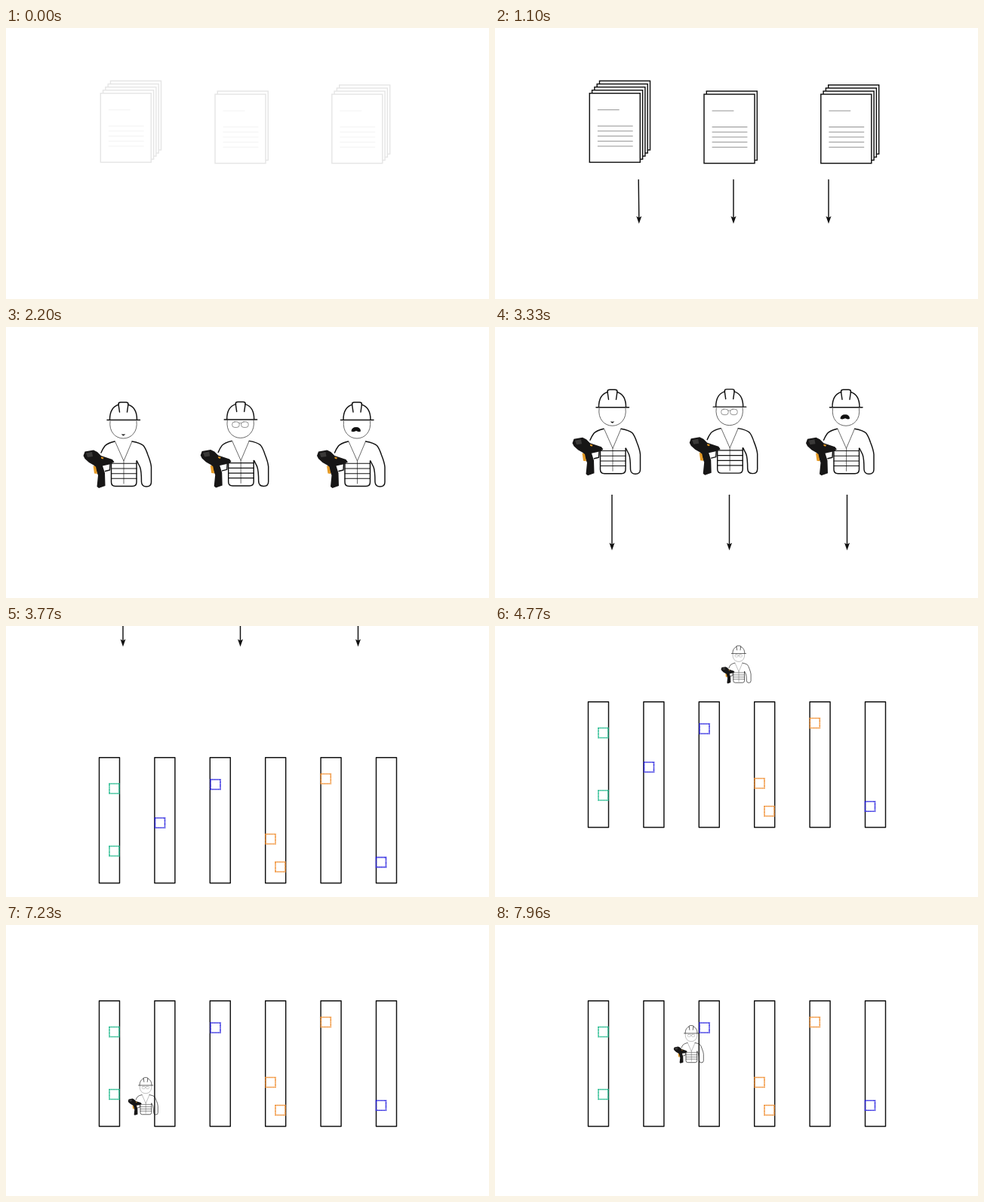
These frames come from a looping animation (640x360 px, 8 s). An HTML page:

```html
<!DOCTYPE html>
<html lang="en">
<head>
<meta charset="utf-8">
<title>Order picking</title>
<style>
  html, body { margin: 0; width: 100%; height: 100%; overflow: hidden; background: #fff; }
  svg { display: block; width: 100%; height: 100%; }
  .ink { fill: none; stroke: #111; stroke-width: 1.45; stroke-linecap: round; stroke-linejoin: round; }
  .thin { stroke: #444; stroke-width: .8; }
  .pale { stroke: #777; }
  .sheet { fill: #fff; stroke: #111; stroke-width: 1.45; }
  .slot { fill: none; stroke-width: 1.6; stroke-dasharray: 1.7 .4; }
</style>
</head>
<body>
<svg viewBox="0 0 640 360">
  <defs>
    <clipPath id="wipe1"><rect id="reveal1" x="0" y="201" width="640" height="0"/></clipPath>
    <clipPath id="wipe2"><rect id="reveal2" x="0" y="239" width="640" height="0"/></clipPath>
    <g id="worker">
      <g class="ink">
        <path d="M134 123.500H177.500M137.500 123C137.500 111 143 105 149.500 103M173.500 123C173.500 111 168 105 161.500 103M150.500 113L149 102.500Q149 100 152 100H159Q162 100 162 102.500L160.500 113"/>
        <path class="thin" d="M138 125C136 139 145 148 155.500 148S175 139 173 125"/>
        <path d="M144 152Q134 154.500 131 158Q128 162 126 167M167 152Q178 154 182 157.500Q185 161 188 170Q192 180 192.500 186V206Q192.500 212 186 212Q180 212 179.500 206Q179.500 191 177.500 186L173.500 178"/>
        <path d="M139.500 181V206Q139.500 211.500 145 211.500H167.500Q173 211.500 173 206V178"/>
        <path class="thin" d="M144.500 152L156 178L167 152M156 178V208"/>
        <path d="M139.500 181.200H173M139.500 188H173M139.500 194.700H173M139.500 201.200H173" stroke-width="1.100"/>
      </g>
      <path fill="#171616" d="M102.500 171L104.500 165.500L116 163.500L121 166L126 171L141 176L143.500 179.500L137 182.500L128 184.500L131 194L131.500 211L123 214L120.500 212L122 197L117 184L110 180L104.500 175Z"/>
      <path class="ink" stroke-width="1" d="M138 182L137.500 190L131.500 191.500"/>
      <path fill="#3a3938" d="M106 167.500L114 166L115 172L108 173Z"/>
      <path fill="#e59a25" d="M115.500 184L119 185.500L121 195L117 194.500ZM126 172.500L129.500 173.500L128.500 175.500L126 174.500Z"/>
    </g>
    <g id="glasses" class="ink thin pale">
      <rect x="144.500" y="126.500" width="9.500" height="7.500" rx="3.300"/>
      <rect x="156.500" y="126.500" width="9.500" height="7.500" rx="3.300"/>
      <path d="M154 128.500Q155.300 127.500 156.500 128.500"/>
    </g>
  </defs>
  <g id="orders">
    <g id="sheets"></g>
    <g id="arrows1" clip-path="url(#wipe1)"></g>
  </g>
  <g id="crew">
    <use href="#worker"/>
    <path d="M152.800 142Q155.500 143 158.200 142Q155.500 146.800 152.800 142Z" fill="#111"/>
    <g transform="translate(155.200 -.6)"><use href="#worker"/><use href="#glasses"/></g>
    <use href="#worker" x="309.500"/>
    <path d="M457.500 138.500Q458 133 464 133Q469.800 133 470 138.500Q467.500 140 464 138Q460.500 140 457.500 138.500Z" fill="#111"/>
    <g id="arrows2" clip-path="url(#wipe2)"></g>
  </g>
  <g id="racks"></g>
  <g id="picker"><g transform="scale(.44) translate(-102 -99.500)"><use href="#worker"/><use href="#glasses"/></g></g>
</svg>
<script>
const $ = id => document.getElementById(id);
const clamp = x => Math.max(0, Math.min(1, x));
const span = (t, start, length) => clamp((t - start) / length);
const smooth = x => .5 - .5 * Math.cos(Math.PI * x);

function pile(x, y, count, dx) {
  let out = '';
  for (let i = count - 1; i >= 0; i--)
    out += `<rect class="sheet" x="${x + i * dx}" y="${y - i * 4.1}" width="67" height="91.700"/>`;
  let lines = `M${x + 11} ${y + 22}h28`;
  for (let i = 0; i < 5; i++) lines += `M${x + 11} ${y + 43.5 + i * 6.7}h46`;
  return out + `<path class="ink thin pale" d="${lines}"/>`;
}

const arrow = (x, top, tip, lean = 0) =>
  `<path class="ink" stroke-linecap="butt" d="M${x - lean} ${top}L${x} ${tip - 8}"/>` +
  `<path fill="#111" d="M${x} ${tip}l-3.500 -10l3.500 2l3.500 -2Z"/>`;

const slot = (x, y, color, id = '') =>
  `<rect class="slot" id="${id}" x="${x}" y="${y}" width="13" height="13" stroke="${color}"/>`;

const green = '#1fba8c', blue = '#2a24e0', orange = '#f08d2e';

$('sheets').innerHTML = pile(125.3, 86.7, 5, 3.3) + pile(277, 88, 2, 3.3) + pile(431.8, 88, 4, 3.3);
$('arrows1').innerHTML = arrow(190.8, 201.7, 260, .6) + arrow(316, 201.7, 260) + arrow(442, 201.7, 260);
$('arrows2').innerHTML = [155, 310.5, 466.5].map(x => arrow(x, 240, 313.5)).join('');
$('racks').innerHTML =
  [0, 1, 2, 3, 4, 5].map(i =>
    `<rect class="ink" x="${123.5 + i * 73.4}" y="100.700" width="27" height="166.800"/>`).join('') +
  slot(137, 135.5, green) + slot(137, 218.5, green) +
  slot(197.5, 181, blue, 'picked') + slot(271, 130, blue) + slot(490.5, 233.3, blue) +
  slot(344, 202.5, orange) + slot(357, 239.5, orange) + slot(417.3, 122.5, orange);

// Slide push: accelerate, cruise, then a long settling tail.
function push(ms) {
  if (ms <= 0) return 0;
  if (ms < 260) return .23 * (ms / 260) ** 2;
  if (ms < 560) return .23 + .0019 * (ms - 260);
  return ms > 1030 ? 1 : 1 - .2 * Math.exp((560 - ms) / 105);
}

// Point at fraction p of the length of a right-angled route.
function along(route, p) {
  const length = (a, b) => Math.hypot(b[0] - a[0], b[1] - a[1]);
  let left = p * route.slice(1).reduce((sum, b, i) => sum + length(route[i], b), 0);
  for (let i = 1; i < route.length; i++) {
    const [a, b] = [route[i - 1], route[i]], step = length(a, b);
    if (left <= step) return [0, 1].map(k => a[k] + (b[k] - a[k]) * left / step);
    left -= step;
  }
  return route[route.length - 1];
}

const firstRoute = [[299.3, 26], [161.5, 26], [161.5, 126]];
const secondRoute = [[161.5, 126], [161.5, 262], [236.5, 262], [236.5, 126]];

const shift = (id, x, y) => $(id).setAttribute('transform', `translate(${x} ${y})`);

function draw(t) {
  const p1 = push(t - 1167), p2 = push(t - 3214);
  shift('orders', 0, -360 * p1);
  shift('crew', 0, 360 * (1 - p1 - p2));
  shift('racks', 0, 360 * (1 - p2));

  $('sheets').setAttribute('opacity', .1 + .9 * span(t, 70, 430));
  $('reveal1').setAttribute('height', 60 * span(t, 500, 420));
  $('reveal2').setAttribute('height', 76 * span(t, 2670, 500));

  const [x, y] = t < 6850
    ? along(firstRoute, smooth(span(t, 5130, 1050)))
    : along(secondRoute, smooth(span(t, 6850, 1225)));
  shift('picker', x, y);
  $('picker').setAttribute('opacity', span(t, 4330, 440));
  $('picked').setAttribute('opacity', 1 - span(t, 6350, 480));
}

const begin = performance.now();
function tick() {
  draw((performance.now() - begin) % 8000);
  requestAnimationFrame(tick);
}
tick();
</script>
</body>
</html>
```
